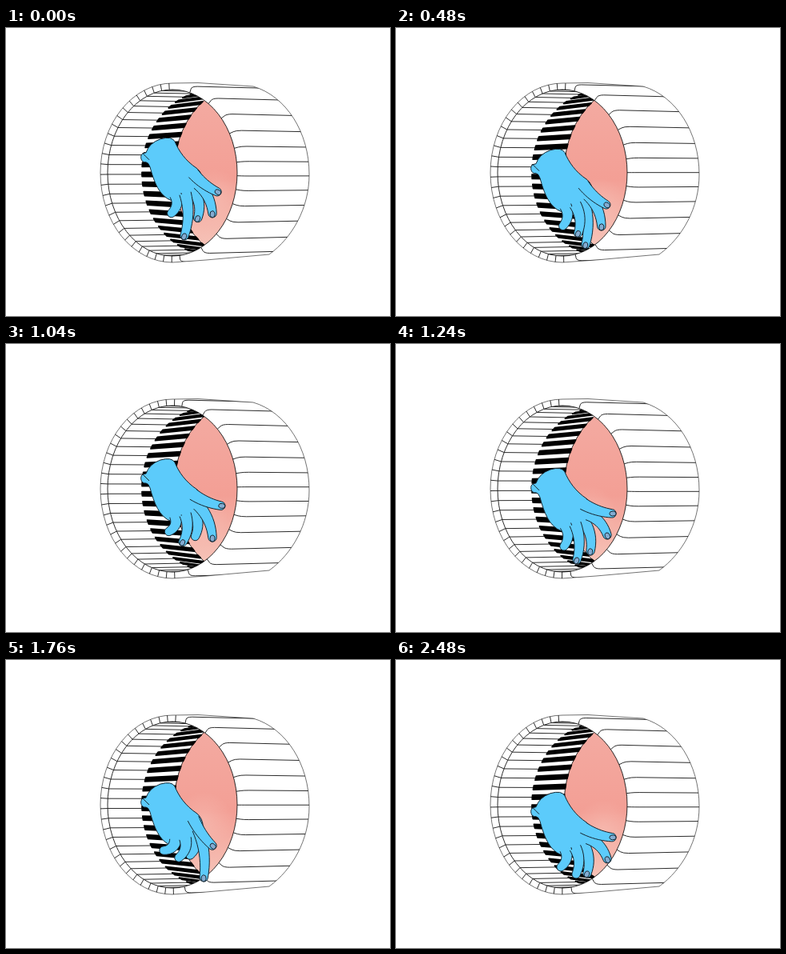
An HTML page with a canvas that plays this animation: 480 by 360 pixels, repeating every 2520 ms.

```html
<!DOCTYPE html>
<html lang="en">
<head>
<meta charset="utf-8">
<title>Piano wheel</title>
<style>
  html, body { margin: 0; width: 100%; height: 100%; overflow: hidden; background: #fff; }
  canvas { display: block; width: 480px; height: 360px; }
</style>
</head>
<body>
<canvas id="stage" width="480" height="360"></canvas>
<script>
const ctx = document.getElementById('stage').getContext('2d');
const LOOP = 2520, TURN = LOOP / 4, DEG = Math.PI / 180;
const INK = '#151515', BLUE = '#5ccbfb', NAIL = '#83acd2';

// Ellipses: cx, cy, rx, ry
const RIM = [208, 181, 90, 112];
const MOUTH = [208, 181, 81, 104];
const BLACKS = [257, 181, 87, 103];
const BACK = [295, 181, 85, 109];

// Drawing holds: start, length
const HOLDS = [[0, 80], [400, 40], [560, 80], [640, 40], [1320, 80], [1640, 40], [1760, 80], [2400, 40]];

// Spread fingers relative to the wrist, thumb side first
const FINGERS = [
  { base: [27, 44], tip: [63, 56] },
  { base: [33, 57], tip: [57, 83] },
  { base: [28, 66], tip: [36, 103] },
  { base: [17, 69], tip: [22, 106] },
  { base: [5, 71], tip: [3, 97] }
];

// Gestures: time, leading finger, press, curl of the others, droop of the first two
const GESTURES = [
  [0, 3, 1, .25, .5],
  [480, 2, 1, .1, .6],
  [840, 1, 1.6, 1, .2],
  [1240, 3, .5, 0, 0],
  [1760, 1, .8, 1, 1],
  [2080, 3, .3, .2, 0],
  [2480, 2, .1, .3, 0]
];

const mix = (a, b, u) => a + (b - a) * u;
const ease = u => u * u * (3 - 2 * u);
const fract = v => v - Math.floor(v);
const at = ([cx, cy, rx, ry], a) => [cx + rx * Math.cos(a), cy + ry * Math.sin(a)];
const count = (n, f) => Array.from({ length: n }, (_, k) => f(k));

function trace(e, from = 0, to = 2 * Math.PI) {
  ctx.beginPath();
  ctx.ellipse(...e, 0, from, to);
}

function line(...pts) {
  ctx.beginPath();
  pts.forEach(p => ctx.lineTo(...p));
  ctx.stroke();
}

function pen(color, width) {
  ctx.strokeStyle = color;
  ctx.lineWidth = width;
  ctx.lineJoin = 'round';
}

function expose(t) {
  const [start, hold] = HOLDS.filter(h => h[0] <= t).pop();
  return start + Math.floor((t - start) / hold) * hold;
}

// Near keys look wider towards the top and bottom of the wheel
function nearAngles(phase) {
  return count(17, k => k - 8 + phase)
    .map(s => (9.3 * s + .107 * s ** 3) * DEG)
    .filter(a => Math.abs(a) < 87 * DEG);
}

function farAngles(phase) {
  return count(29, k => Math.PI + (k - 14 + phase) * 6.8 * DEG)
    .filter(a => Math.cos(a) < .05);
}

function bodyPath() {
  ctx.beginPath();
  ctx.moveTo(208, 69);
  ctx.lineTo(240, 68.5);
  ctx.lineTo(309, 73);
  ctx.bezierCurveTo(350, 85, 379, 130, 379, 183);
  ctx.bezierCurveTo(379, 225, 358, 262, 329, 283);
  ctx.lineTo(250, 290);
  ctx.lineTo(208, 293);
}

function outerKeys(angles) {
  ctx.save();
  bodyPath();
  ctx.clip();
  for (const a of angles) {
    const p = at(MOUTH, a), q = at(RIM, a);
    ctx.beginPath();
    ctx.moveTo(...p);
    ctx.lineTo(mix(p[0], q[0], .6), mix(p[1], q[1], .6));
    ctx.quadraticCurveTo(...q, q[0] + 7, q[1]);
    ctx.lineTo(390, mix(181, q[1], .965));
    ctx.stroke();
  }
  ctx.restore();
}

function pinkGap(t) {
  const wash = ctx.createLinearGradient(0, 90, 0, 270);
  wash.addColorStop(0, '#f3aaa1');
  wash.addColorStop(.55, '#f39f95');
  wash.addColorStop(1, '#f6c2b7');
  const a = 2 * Math.PI * t / LOOP;
  const x = 250 + 10 * Math.cos(a), y = 212 + 12 * Math.sin(a);
  const glow = ctx.createRadialGradient(x, y, 2, x, y, 36);
  glow.addColorStop(0, 'rgba(248,200,190,.4)');
  glow.addColorStop(1, 'rgba(248,200,190,0)');
  trace(BACK);
  for (const paint of [wash, glow]) {
    ctx.fillStyle = paint;
    ctx.fill();
  }
  ctx.stroke();
}

function blackKey(a) {
  const half = 1.45 * DEG;
  ctx.beginPath();
  for (const [e, d] of [[BLACKS, -half], [BACK, -half], [BACK, half], [BLACKS, half]]) {
    ctx.lineTo(...at(e, a + d));
  }
  ctx.closePath();
  ctx.fillStyle = '#000';
  ctx.fill();
  ctx.save();
  pen('#000', 1.8);
  ctx.stroke();
  ctx.restore();
}

function innerKeys(angles, t) {
  ctx.save();
  trace(MOUTH);
  ctx.clip();
  pinkGap(t);
  for (const a of angles) {
    line(at(MOUTH, a), at(BLACKS, a));
    blackKey(a);
  }
  ctx.restore();
}

function wheel(t) {
  const turn = t / TURN;
  const far = farAngles(fract(turn + .84));
  pen(INK, .9);
  innerKeys(far, t);
  outerKeys(nearAngles(fract(turn + .22)));
  for (const a of far) line(at(MOUTH, a), at(RIM, a));
  trace(MOUTH);
  ctx.stroke();
  pen(INK, .6);
  bodyPath();
  ctx.stroke();
  trace(RIM, Math.PI / 2, Math.PI * 1.5);
  ctx.stroke();
}

function finger([bx, by], [tx, ty], bow) {
  const len = Math.hypot(tx - bx, ty - by);
  const kx = (bx + tx) / 2 + (ty - by) / len * bow;
  const ky = (by + ty) / 2 - (tx - bx) / len * bow;
  const left = [], right = [], tip = 5.2;
  let dir = 0;
  for (let i = 0; i <= 10; i++) {
    const u = i / 10, v = 1 - u, w = mix(7.4, tip, u);
    const x = v * v * bx + 2 * u * v * kx + u * u * tx;
    const y = v * v * by + 2 * u * v * ky + u * u * ty;
    dir = Math.atan2(v * (ky - by) + u * (ty - ky), v * (kx - bx) + u * (tx - kx));
    const nx = Math.sin(dir) * w, ny = -Math.cos(dir) * w;
    left.push([x + nx, y + ny]);
    right.unshift([x - nx, y - ny]);
  }
  ctx.beginPath();
  left.forEach(p => ctx.lineTo(...p));
  ctx.arc(tx, ty, tip, dir - Math.PI / 2, dir + Math.PI / 2);
  right.forEach(p => ctx.lineTo(...p));
  ctx.fillStyle = BLUE;
  ctx.fill();
  ctx.stroke();
  if (len > 34) {
    ctx.beginPath();
    ctx.ellipse(tx + Math.cos(dir), ty + Math.sin(dir), 4, 3, dir, 0, 2 * Math.PI);
    ctx.fillStyle = NAIL;
    ctx.fill();
    ctx.stroke();
  }
}

function palm() {
  ctx.beginPath();
  ctx.moveTo(-32, 18);
  ctx.quadraticCurveTo(-28, 6, -14, 1);
  ctx.quadraticCurveTo(0, -3, 4, 4);
  ctx.bezierCurveTo(9, 16, 17, 28, 32, 38);
  ctx.bezierCurveTo(41, 46, 41, 60, 36, 66);
  ctx.bezierCurveTo(26, 74, 14, 77, 0, 78);
  ctx.bezierCurveTo(-16, 72, -22, 54, -27, 36);
  ctx.quadraticCurveTo(-29, 30, -32, 30);
  ctx.bezierCurveTo(-39, 31, -40, 21, -36, 19);
  ctx.closePath();
  ctx.fillStyle = BLUE;
  ctx.fill();
  ctx.stroke();
  line([-36, 19], [-32, 23], [-28, 27]);
}

// Sinks slowly with the keys, then springs back up
function wristTop(t) {
  const u = fract(t / TURN - .3), low = .64;
  const sink = u < low ? (u / low) ** 1.5 : Math.exp(-(((u - low) / .05) ** 2));
  return 129 + 37 * sink;
}

function reach(i, [, lead, press, curl, droop]) {
  let [x, y] = FINGERS[i].tip;
  const push = press * Math.max(0, 1 - Math.abs(i - lead));
  x -= 6 * push;
  y += 16 * push;
  const fold = i > 1 ? curl * (1 - Math.min(1, push)) : 0;
  const drop = i < 2 ? droop : 0;
  return [x - 13 * fold - 12 * drop, y - 13 * fold + 22 * drop];
}

function hand(t) {
  const keys = [...GESTURES, [LOOP, ...GESTURES[0].slice(1)]];
  const n = keys.findIndex(k => k[0] > t);
  const a = keys[n - 1], b = keys[n];
  const u = ease((t - a[0]) / (b[0] - a[0]));
  ctx.save();
  ctx.translate(207, wristTop(t));
  pen('#15242e', 1);
  palm();
  for (const i of [2, 4, 3, 1, 0]) {
    const from = reach(i, a), to = reach(i, b);
    finger(FINGERS[i].base, from.map((v, k) => mix(v, to[k], u)), i ? 8 : -4);
  }
  ctx.restore();
}

function draw(now) {
  const t = expose(now % LOOP);
  ctx.fillStyle = '#fff';
  ctx.fillRect(0, 0, 480, 360);
  wheel(t);
  hand(t);
}

let begin;
function tick(now) {
  begin ??= now;
  draw(now - begin);
  requestAnimationFrame(tick);
}
draw(0);
requestAnimationFrame(tick);
</script>
</body>
</html>
```
